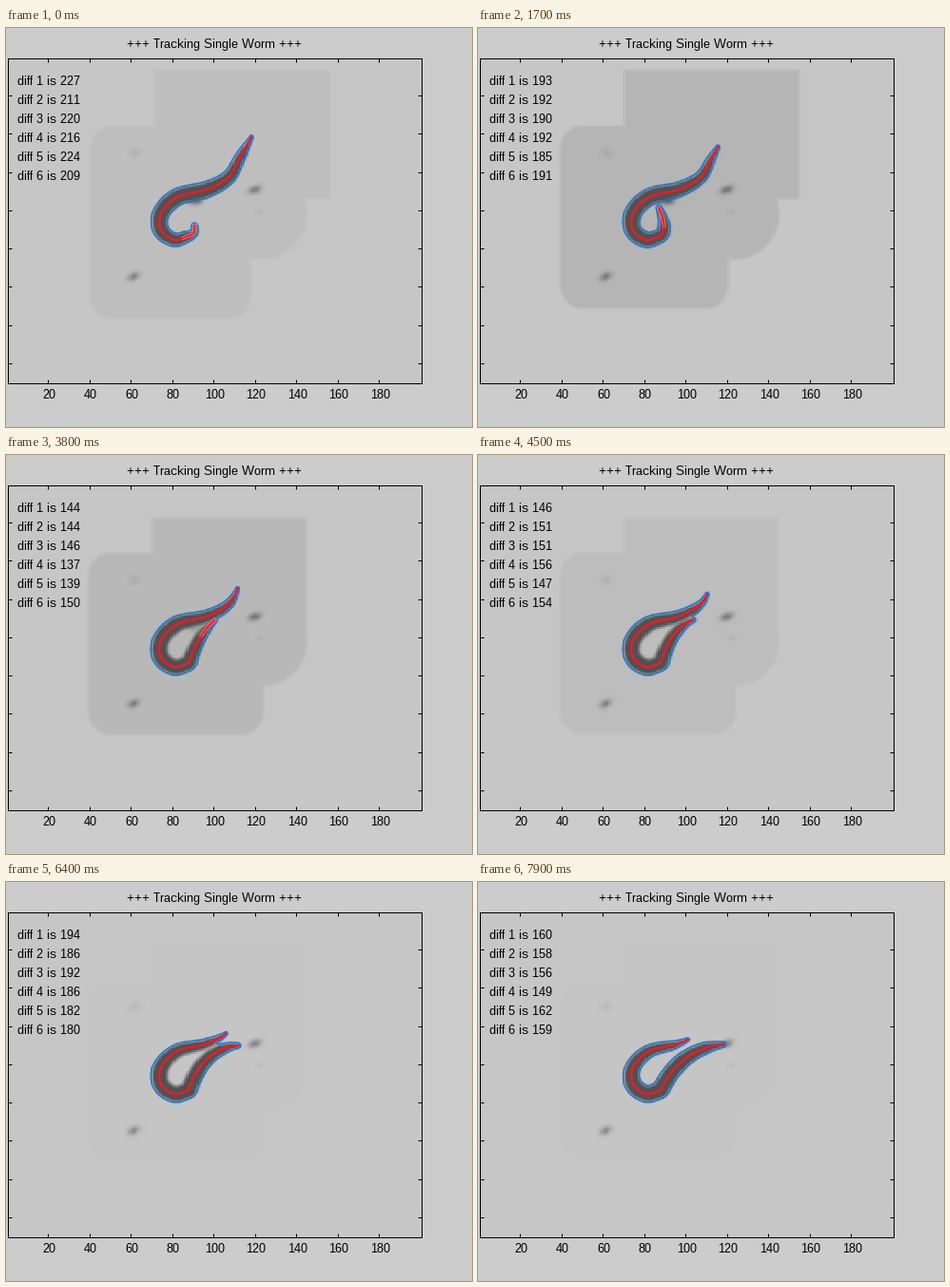
A matplotlib script for the animation above (8000 ms loop, 490 by 420 pixels).

```python
import numpy as np
import matplotlib.pyplot as plt
from matplotlib.animation import FuncAnimation

W, H, DPI = 490, 420, 100
FRAMES, INTERVAL, HOLD = 80, 100, 4
L, R, T, B = 2, 437, 32, 374
COLS, ROWS = 200, 170
PX = 72 / DPI

plt.rcParams.update({
    "font.family": "Liberation Sans",
    "font.size": 13 * PX,
    "text.hinting": "default",
    "text.hinting_factor": 1,
})

# Path the front of the worm backs along; the tail swings from its end
TRACK = [(258, 115), (246, 136), (234, 157), (211, 170), (180, 178),
         (163, 195), (163, 213), (177, 223), (192, 219)]
RETREAT = 64

gx, gy = np.meshgrid(L + (np.arange(COLS) + .5) * (R - L) / COLS,
                     T + (np.arange(ROWS) + .5) * (B - T) / ROWS)
WIN = np.s_[30:110, 56:134]
wx, wy = gx[WIN], gy[WIN]

S = np.linspace(0, 1, 100)
HALF = np.interp(S, [0, .1, .25, .4, .6, .75, .9, 1],
                 [2, 5.2, 7.2, 8.8, 9, 8.4, 6.4, 3])


def smooth(t):
    t = np.clip(t, 0, 1)
    return t * t * (3 - 2 * t)


def spline(points, n=20):
    """Catmull-Rom curve through the points."""
    p = np.array(points, float)
    p = np.vstack([2 * p[0] - p[1], p, 2 * p[-1] - p[-2]])
    t = np.linspace(0, 1, n)[:, None]
    return np.vstack([
        .5 * (2 * b + (c - a) * t + (2 * a - 5 * b + 4 * c - d) * t ** 2
              + (3 * b - a - 3 * c + d) * t ** 3)
        for a, b, c, d in zip(p, p[1:], p[2:], p[3:])])


def lengths(q):
    return np.r_[0, np.cumsum(np.hypot(*np.diff(q, axis=0).T))]


def bezier(a, b, c, n=30):
    t = np.linspace(0, 1, n)[:, None]
    return (1 - t) ** 2 * a + 2 * t * (1 - t) * b + t ** 2 * c


track = spline(TRACK)
track_s = lengths(track)


def midline_at(p):
    """Head-to-tail midline at progress p from 0 to 1."""
    front = track[track_s >= RETREAT * p]
    # The tail curls up inside the loop, then flips out to the right
    stops = [0, .31, .45, 1]
    tip = np.array([np.interp(p, stops, [198, 184, 219, 258]),
                    np.interp(p, stops, [208, 174, 174, 171])])
    elbow = np.array([200 + 13 * p ** 3, 217 - 42 * smooth(p / .75)])
    q = np.vstack([front, bezier(track[-1], elbow, tip)])
    s = lengths(q)
    return np.column_stack([np.interp(S * s[-1], s, q[:, k]) for k in (0, 1)])


def box(x0, y0, x1, y1, r):
    """Signed distance to a rounded box."""
    u = abs(gx - (x0 + x1) / 2) - (x1 - x0) / 2 + r
    v = abs(gy - (y0 + y1) / 2) - (y1 - y0) / 2 + r
    return (np.hypot(np.maximum(u, 0), np.maximum(v, 0))
            + np.minimum(np.maximum(u, v), 0) - r)


def area(lower, upper):
    disc = np.hypot(gx - 268, gy - 196) - 48
    dist = np.minimum(np.minimum(box(*lower, 24), box(*upper, 2)), disc)
    return np.clip(.5 - dist / 4, 0, 1)


def spot(x, y, a, b, angle):
    c, s = np.cos(angle), np.sin(angle)
    u, v = (gx - x) * c + (gy - y) * s, (gy - y) * c - (gx - x) * s
    return np.exp(-(u / a) ** 2 - (v / b) ** 2)


AREAS = [area((88, 103, 257, 306), (156, 44, 340, 180)),
         area((86, 103, 263, 295), (153, 44, 337, 180)),
         area((86, 103, 271, 294), (153, 66, 315, 205))]
SWITCH = [9, 32]
SPOTS = (65 * spot(261, 170, 7, 4, -.35) + 62 * spot(134, 262, 6, 4, -.5)
         + 12 * spot(135, 131, 6, 5, -.5) + 8 * spot(266, 193, 4, 3, 0))
SHADOW = 80 * spot(199, 182, 7, 4, -.1)

# Per-frame curves: depth of the darker area and level of the readouts
KEYS = [HOLD, 17, 27, 38, 52, 64, 79]
DEPTH = np.interp(range(FRAMES), KEYS, [8, 17, 15, 14, 5, 1.5, 1])
LEVEL = np.interp(range(FRAMES), KEYS, [220, 188, 140, 144, 159, 193, 153])
rng = np.random.default_rng(4)
DIFFS = np.rint(LEVEL[:, None] + rng.normal(0, 5, (FRAMES, 6))).astype(int)

fig = plt.figure(figsize=(W / DPI, H / DPI), dpi=DPI, facecolor="#cccccc")
ax = fig.add_axes([L / W, 1 - B / H, (R - L) / W, (B - T) / H])
img = ax.imshow(np.zeros((ROWS, COLS)), cmap="gray", vmin=0, vmax=255,
                extent=(L, R, B, T), aspect="auto", interpolation="nearest")
ax.set(xlim=(L, R), ylim=(B, T), autoscale_on=False)

xticks = np.arange(20, 200, 20)
xpos = L + (xticks - .5) * (R - L) / COLS
ypos = T + (np.arange(20, 170, 20) - .5) * (B - T) / ROWS
ax.set_xticks(xpos, [])
ax.set_yticks(ypos, [])
ax.tick_params(direction="in", length=4 * PX, width=PX, top=True, right=True)
for side in ax.spines.values():
    side.set_linewidth(PX)

for x, n in zip(xpos, xticks):
    ax.text(x + 1, 390.5, str(n), ha="center", va="baseline")
ax.text(219, 21.5, "+++ Tracking Single Worm +++", ha="center", va="baseline")
labels = [ax.text(12, 60 + 20 * k, "", va="baseline") for k in range(6)]

outline, = ax.plot([], [], color="#1778e0", lw=1.4 * PX, zorder=3)
tail, = ax.plot([], [], color="#ff8c9c", lw=3.6 * PX, zorder=4)
midline, = ax.plot([], [], color="#ff1428", lw=2.2 * PX, zorder=5)


def outer_contour(field):
    cs = ax.contour(wx, wy, field, [0])
    segs = cs.allsegs[0]
    cs.remove()
    return max(segs, key=lambda s: np.prod(np.ptp(s, axis=0)))


def update(frame):
    i = max(frame, HOLD)
    mid = midline_at((i - HOLD) / (FRAMES - 1 - HOLD))
    dist = np.hypot(wx[..., None] - mid[:, 0], wy[..., None] - mid[:, 1])
    field = (HALF - dist).max(axis=-1)

    mask = AREAS[np.searchsorted(SWITCH, i, "right")]
    gray = 198 - DEPTH[i] * mask - SPOTS
    gray -= SHADOW * np.clip((42 - i) / 12, 0, 1)
    body = np.clip((field + 1.5) / 4.5, 0, 1)
    gray[WIN] = gray[WIN] * (1 - body) + np.minimum(gray[WIN], 82) * body
    img.set_data(gray)

    outline.set_data(*outer_contour(field).T)
    midline.set_data(*mid.T)
    tail.set_data(*mid[-11:].T)
    tail.set_visible(i < 42)

    for k, label in enumerate(labels):
        label.set_text(f"diff {k + 1} is {DIFFS[i, k]}")
    return [img, outline, midline, tail, *labels]


anim = FuncAnimation(fig, update, frames=FRAMES, interval=INTERVAL,
                     repeat=True, repeat_delay=0, cache_frame_data=False)
plt.show()
```
